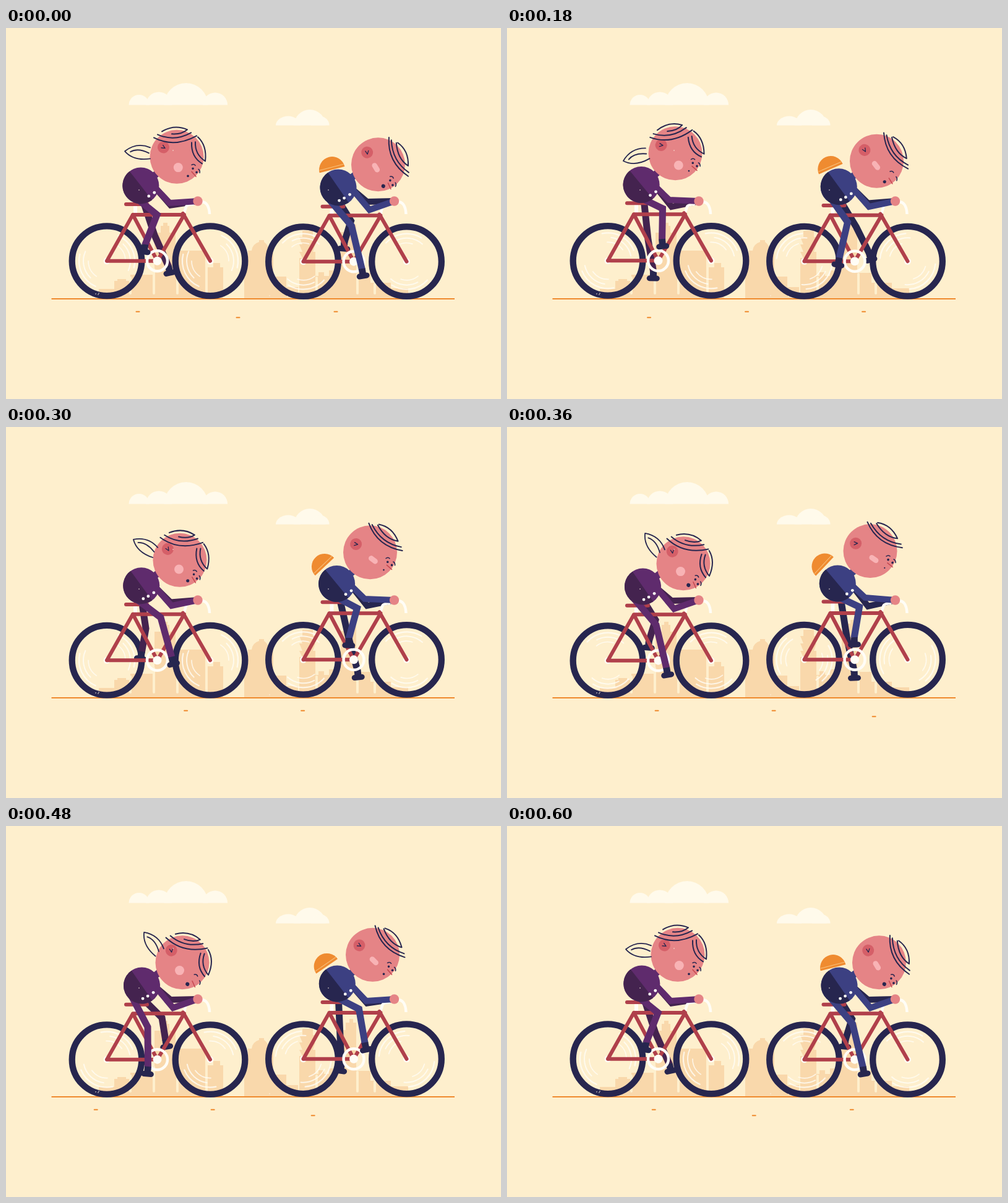
These frames come from a looping animation (800x600 px, 0.63 s). An HTML page:

```html
<!DOCTYPE html>
<html lang="en">
<head>
<meta charset="utf-8">
<title>Two cyclists</title>
<style>
html, body { margin: 0; width: 100%; height: 100%; overflow: hidden; background: #feefcd; }
svg { display: block; width: 800px; height: 600px; }
</style>
</head>
<body>
<svg viewBox="0 0 800 600" xmlns="http://www.w3.org/2000/svg">
  <defs>
    <clipPath id="c1"><rect x="190" y="80" width="180" height="44.5"/></clipPath>
    <clipPath id="c2"><rect x="430" y="120" width="100" height="37.5"/></clipPath>
  </defs>
  <rect width="800" height="600" fill="#feefcd"/>
  <g fill="#fffaeb">
    <g clip-path="url(#c1)">
      <circle cx="215" cy="124.500" r="16.500"/><circle cx="247" cy="124.500" r="21"/>
      <circle cx="291" cy="124.500" r="35.500"/><circle cx="338" cy="124.500" r="20"/>
    </g>
    <g clip-path="url(#c2)">
      <ellipse cx="456" cy="157.500" rx="20" ry="15"/><circle cx="491" cy="157.500" r="25.500"/>
      <circle cx="508" cy="157.500" r="14.500"/>
    </g>
  </g>
  <g fill="#f9d8ab">
    <path d="M150 438V422H175V409H180V406H194V409H201V399H240V331H250V320H254V315H261V320H264V331H274V360H322V387H335V380H346V387H351V438H385V386H391V360H397A16 16 0 0 1 409 346V343H417V346A16 16 0 0 1 424 360H432V402H453V419H472V438Z"/>
    <path d="M474 438V372H479L474 362H479L474 350H479L474 338H479V328H496V338H500L496 350H500L496 362H500V401H505V395H514V401H522V392H541V330H549V318H555V312H561V318H566V396H589V412H622V421H650V438Z"/>
  </g>
  <g stroke="#feefcd" stroke-width="4" stroke-linecap="round">
    <path d="M201 404V429M239 390V429M277 390V429M324 380V429M502 404V429M568 398V429M596 414V429"/>
  </g>
  <path d="M73.500 438H725" stroke="#ef8a2e" stroke-width="2.200"/>
  <g id="dashes" stroke="#ef8a2e" stroke-width="2" stroke-linecap="round"></g>
  <g id="woman"></g>
  <g id="man" transform="translate(317.500 0)"></g>
  <g id="specks"></g>
</svg>
<script>
const NAVY = '#27264f', RED = '#b0404b', SKIN = '#e58486', WHITE = '#fffdf6';
const STEP = 30, LOOP = 630, CYCLE = 600, RAD = Math.PI / 180;
const byId = id => document.getElementById(id);

// Knee positions, ten per pedal turn, starting with the near foot on top
const NEAR_KNEE = [[252, 291], [251.5, 292], [253, 296], [250, 308], [241, 320],
  [235.5, 328], [229, 325], [233, 314], [244, 302], [250, 293]];
const FAR_KNEE = [[232, 342], [228, 342], [222.5, 340], [226, 326], [240, 312],
  [251, 310], [252, 310], [247, 322], [240, 335], [236, 340]];

const WOMAN = { light: '#5f2b6d', dark: '#44234f', limb: '#44234f', top: 120 };
const MAN = { light: '#3c4082', dark: NAVY, limb: NAVY, top: 360, man: true };

const mod = (a, n) => ((a % n) + n) % n;
const n2 = v => v.toFixed(2);

function spline(list, p) {
  const i = Math.floor(p), f = p - i;
  const at = k => list[mod(i + k, list.length)];
  return [0, 1].map(d => {
    const a = at(-1)[d], b = at(0)[d], c = at(1)[d], e = at(2)[d];
    return b + f / 2 * (c - a + f * (2 * a - 5 * b + 4 * c - e + f * (3 * (b - c) + e - a)));
  });
}

const path = (d, color, w, extra = '') =>
  `<path d="${d}" fill="none" stroke="${color}" stroke-width="${w}" ${extra}/>`;
const round = (d, color, w) => path(d, color, w, 'stroke-linecap="round" stroke-linejoin="round"');
const dot = (x, y, r, color) => `<circle cx="${n2(x)}" cy="${n2(y)}" r="${n2(r)}" fill="${color}"/>`;
const group = (x, y, deg, body) =>
  `<g transform="translate(${n2(x)} ${n2(y)}) rotate(${n2(deg)})">${body}</g>`;
const line = pts => 'M' + pts.map(p => n2(p[0]) + ' ' + n2(p[1])).join('L');

function arc(r, a, b) {
  const p = q => n2(r * Math.cos(q * RAD)) + ' ' + n2(r * Math.sin(q * RAD));
  return `M${p(a)}A${r} ${r} 0 0 1 ${p(b)}`;
}

function wheel(x, y, spin) {
  const streaks = [0, 180].map(a =>
    round(arc(45, a - 48, a + 32), WHITE, 2.2) + round(arc(38, a - 28, a + 42), WHITE, 2) +
    round(arc(30, a - 38, a + 18), WHITE, 1.6)).join('');
  return group(x, y, spin, `<g opacity=".8">${streaks}</g>`) +
    `<circle cx="${x}" cy="${n2(y)}" r="56.3" fill="none" stroke="${NAVY}" stroke-width="10.3"/>` +
    dot(x, y, 5.5, WHITE);
}

function leg(hip, knee, turn, color) {
  const x = 244 + 27 * Math.sin(turn), y = 379 - 27 * Math.cos(turn);
  const tilt = -13 * Math.sin(turn) - 2;
  const ankle = [x + 11 * Math.sin(tilt * RAD), y - 11 * Math.cos(tilt * RAD)];
  return path(line([hip, knee, ankle]), color, 11) +
    group(x, y, tilt, path('M0 -12V0', NAVY, 11) + round('M-6 0H6', NAVY, 9));
}

function bike(c, y) {
  const top = 302.3 - 1.3 * c, seat = 286 - 3.5 * c;
  return path(`M209 ${seat}V${top}`, WHITE, 6) +
    round(`M288 ${top - 3}L291 289Q292 286 302 285`, WHITE, 4.5) +
    path('M314 281Q328 280 329 301', WHITE, 4.5) +
    round(`M163 ${y}L205 ${top}H288L244.500 ${y}M205 ${top}L244.500 ${y}M163 ${y}H240M286 ${top - 2}L330 ${y}`, RED, 6) +
    round(`M194 ${seat}H228`, RED, 6) +
    `<circle cx="244.5" cy="${n2(y)}" r="16.5" fill="none" stroke="${WHITE}" stroke-width="4.5"/>` +
    dot(244.5, y, 7, WHITE);
}

function hair(look, c) {
  if (look.man) return round('M4 -47Q13 -8 52 4M9 -44Q20 -12 51 -2M20 -43Q41 -36 47 -12Q27 -18 18 -42', NAVY, 2);
  const tail = round('M0 3Q-27 7 -41 -9Q-22 -24 0 -15M-2 -6Q-20 -15 -32 -8', NAVY, 1.8);
  return group(-43, 0, -28 * (c - 0.31), tail) +
    round('M-24 -41Q-4 -53 17 -44Q8 -36 -8 -37M-31 -36Q-4 -24 23 -39M-37 -31Q-4 -14 32 -34', NAVY, 2) +
    round('M34 -32Q49 -18 46 7Q29 -4 30 -24M24 -23Q23 0 41 11', NAVY, 2);
}

function head(look, c, blink) {
  const x = (look.man ? 277.5 : 278.5) - 8 * c, y = 211.8 - 11.2 * c;
  const ear = (219 - 11 * c) * RAD;
  const cheek = look.man
    ? group(0.6 + 5.3 * c, 8.5 + 4.4 * c, 48 - 13 * c, round('M-4 0H4', '#f8b3b5', 8.5))
    : dot(0.4 + 6 * c, 16 + 4 * c, 7.5, '#f8b3b5');
  const eyes = blink ? '' : dot(26, 19, 1.8, NAVY) + dot(32, 25, 1.8, NAVY);
  const face = eyes + round('M24 24L31 32', '#c5474f', 1.5) +
    round('M24 13q4 -2 6 1M35 20q3 2 2 6', NAVY, 1.5) +
    dot(18, 31, 2.2 - 1.1 * c, NAVY) + hair(look, c);
  return group(x, y, 0, dot(0, 0, 43.5, SKIN) +
    group(26.5 * Math.cos(ear), 26.5 * Math.sin(ear), 45 - 45 * c,
      dot(0, 0, 9.5, '#d55f68') + round('M-2.500 -2.500L3 0L-2.500 2.500', NAVY, 1.3)) +
    cheek + group(0, 0, -15 * (c - 0.31), face));
}

function torso(look, x, y, c) {
  const buttons = [[4, 21], [12, 17], [21, 11.3]].slice(c < 0 ? 0 : 1);
  return dot(x, y, 29.5, look.light) +
    group(x, y, 53 - 3 * c, `<path d="M-29.500 0A29.500 29.500 0 0 0 29.500 0Z" fill="${look.dark}"/>`) +
    buttons.map(b => dot(x + b[0] + 3 * c, y + b[1], 2.4, WHITE)).join('');
}

function rider(t, look) {
  const tau = mod(t - look.top, CYCLE), u = tau / CYCLE * 2 * Math.PI, c = Math.cos(u);
  const turn = u - (16 * Math.sin(u) + 10.5 * Math.sin(2 * u)) * RAD;
  const y = 377 - 0.8 * c, bx = 218.3 - 1.5 * c, by = 255.8 - 2.8 * c;
  const spin = (tau + 120) * 1.8 - 18;
  const shoulder = [bx + 23, by + 3], hand = [310, 280];
  const arm = (elbow, color) => path(line([shoulder, elbow, hand]), color, 10);
  const bag = look.man ? group(203.5 - 7.5 * c, 227.5 - 2 * c, -29 - 18 * c,
    '<path d="M-21 0A21 21 0 0 1 21 0Z" fill="#ef8b30"/>' + path('M-20 -4H20', '#f9c27c', 1)) : '';
  return wheel(163, y, spin) + wheel(330, y, spin) +
    leg([219 + 2 * c, 274 - 2 * c], spline(FAR_KNEE, tau / 60), turn + Math.PI, look.limb) +
    arm([266, 285 + 5 * c], look.dark) + bike(c, y) +
    leg([206 + 4 * c, 273 - 2 * c], spline(NEAR_KNEE, tau / 60), turn, look.light) +
    arm([266 - 5 * c, 286 - 10 * c], look.light) + dot(310, 280, 7.7, SKIN) +
    bag + path(line([[bx + 12, by - 8], [bx + 30, by - 23]]), look.light, 11) +
    torso(look, bx, by, c) + head(look, c, tau > 345 && tau < 435);
}

function dashes(t) {
  const span = 509, x0 = t / LOOP * span;
  return [[213, 459], [533, 459], [375, 468.5]].map(([x, y]) => {
    const px = mod(x - x0 - 140, span) + 140;
    return px < 640 ? `<path d="M${n2(px - 2.5)} ${y - 0.3}h5"/>` : '';
  }).join('');
}

function draw(t) {
  byId('dashes').innerHTML = dashes(t);
  byId('woman').innerHTML = rider(t, WOMAN);
  byId('man').innerHTML = rider(t, MAN);
}

byId('specks').innerHTML = [[145, 430], [149, 431], [150, 429], [426, 433], [270, 198],
  [215, 262], [521, 262], [455, 434], [205, 317]].map(p => dot(p[0], p[1], 0.8, '#fdeee0')).join('');

let start = null, last = -1;
function tick(now) {
  if (start === null) start = now;
  const t = Math.floor(((now - start) % LOOP) / STEP) * STEP;
  if (t !== last) draw(last = t);
  requestAnimationFrame(tick);
}
draw(0);
requestAnimationFrame(tick);
</script>
</body>
</html>
```
